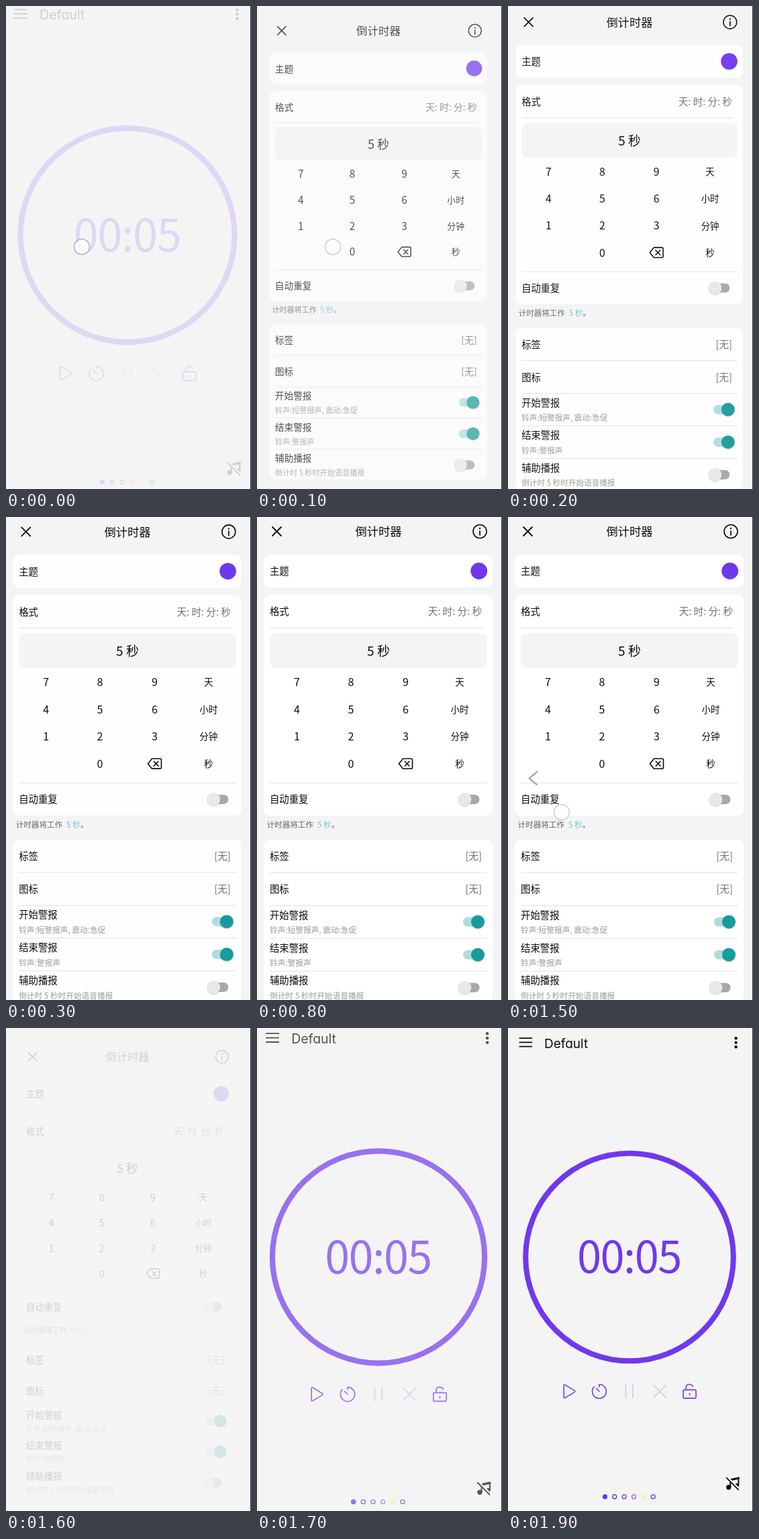
These frames come from a looping animation (365x720 px, 2 s). An HTML page:

```html
<!DOCTYPE html>
<html lang="zh-CN">
<head>
<meta charset="utf-8">
<title>倒计时器</title>
<style>
html, body { margin: 0; width: 100%; height: 100%; overflow: hidden; background: #f4f4f4; }
svg { display: block; width: 100vw; height: 100vh; }
text { font-family: "Noto Sans CJK SC", "Noto Sans CJK JP", "Noto Sans CJK", "Noto Sans", sans-serif; }
.name { font-family: Inter, Lato, sans-serif; font-feature-settings: "cv11"; }
.clock { letter-spacing: -1.5px; }
.line { fill: none; stroke-linecap: round; stroke-linejoin: round; }
</style>
</head>
<body>
<svg viewBox="0 0 365 720">
  <rect width="365" height="720" fill="#f4f4f4"/>
  <g id="timer"></g>
  <g id="settings"></g>
  <path id="back" class="line" d="M6-9.5L-5.5 0L6 9.5" stroke="#a9a9a9" stroke-width="2.3"/>
  <circle id="touch" r="11.5" fill="#fff" fill-opacity=".8" stroke-width="1.5"/>
  <rect x="364" width="1" height="720" fill="#2c2c2c"/>
</svg>
<script>
const $ = id => document.getElementById(id);
const PURPLE = '#6f37ee', INK = '#0c0c0c', GREY = '#707070', PALE = '#999';

const text = (x, cy, size, str, fill = INK, anchor = 'start', cls = '') =>
  `<text x="${x}" y="${cy + size * 0.37}" font-size="${size}" fill="${fill}" text-anchor="${anchor}" class="${cls}">${str}</text>`;
const stroke = (d, color, width = 1.6) =>
  `<path class="line" d="${d}" stroke="${color}" stroke-width="${width}"/>`;
const disc = (x, y, r, fill) => `<circle cx="${x}" cy="${y}" r="${r}" fill="${fill}"/>`;
const ring = (x, y, r, color, width) =>
  `<circle cx="${x}" cy="${y}" r="${r}" fill="none" stroke="${color}" stroke-width="${width}"/>`;
const box = (x, y, w, h, fill, rx = 9) =>
  `<rect x="${x}" y="${y}" width="${w}" height="${h}" rx="${rx}" fill="${fill}"/>`;
const rule = (y, end = 343) => box(19, y - 0.5, end - 19, 1, '#e2e2e2', 0);
const label = (y, str) => text(19, y, 14.4, str);
const note = (y, str) => text(19, y, 11.7, str, PALE);
const value = (y, str) => text(335, y, 14.6, str, GREY, 'end');

function toggle(y, on) {
  const x = on ? 329 : 309.5;
  return box(307, y - 7, 24.5, 14, on ? '#b0dddc' : '#a8a8a8', 7) +
    disc(x, y + 0.8, 10.4, 'rgba(0,0,0,.13)') +
    disc(x, y, 10, on ? '#169c9b' : '#e8e8e8');
}

function keypad() {
  const cols = [59.5, 140, 221.5, 302], rows = [246, 287, 327.5, 368];
  const keys = [['7', '8', '9', '天'], ['4', '5', '6', '小时'], ['1', '2', '3', '分钟'], ['', '0', '', '秒']];
  return keys.map((row, r) => row.map((key, c) =>
    text(cols[c], rows[r], c < 3 ? 16 : 13.5, key, INK, 'middle')).join('')).join('');
}

function settingsView() {
  return stroke('M23 15L36 28M36 15L23 28', INK, 1.8) +
    text(181, 22, 17.3, '倒计时器', INK, 'middle') +
    ring(332, 21.5, 10, INK, 1.6) + disc(332, 17, 1.2, INK) + stroke('M332 20.8V27', INK, 1.7) +
    box(10, 56, 341, 49, '#fff') + label(81, '主题') + disc(330.7, 80.5, 12.4, PURPLE) +
    box(10, 116, 341, 329, '#fff') + label(141, '格式') + value(141, '天: 时: 分: 秒') + rule(165.5, 336) +
    box(19, 173, 324, 52, '#f4f4f4') + text(181, 200, 19, '5 秒', INK, 'middle') +
    keypad() +
    stroke('M217.5 360.3H229.5Q231.5 360.3 231.5 362.3V373.2Q231.5 375.2 229.5 375.2H217.5L211.5 367.8Z', INK) +
    stroke('M220.3 364.3L227 371.2M227 364.3L220.3 371.2', INK) +
    rule(396.5) + label(421, '自动重复') + toggle(421, false) +
    text(14.5, 459, 11.6, '计时器将工作', '#666') + text(90, 459, 11.6, '5 秒', '#69c6d2') + text(111, 459, 11.6, '。', '#666') +
    box(10, 481, 341, 243, '#fff') +
    label(506, '标签') + value(506, '[无]') + rule(530) +
    label(555, '图标') + value(555, '[无]') + rule(579.5) +
    label(593.5, '开始警报') + note(616, '铃声:短警报声, 震动:急促') + toggle(603.5, true) + rule(628) +
    label(642.5, '结束警报') + note(665, '铃声:警报声') + toggle(652.5, true) + rule(677) +
    label(691, '辅助播报') + note(714, '倒计时 5 秒时开始语音播报') + toggle(701.5, false);
}

function timerView() {
  const dots = ['#4b3aa8', '#7541c4', '#a067cf', '', '#5644c4'];
  return stroke('M17.5 15.3H35.5M17.5 21.6H35.5M17.5 27.9H35.5', INK, 1.8) +
    text(54, 22.8, 19, 'Default', INK, 'start', 'name') +
    [15.5, 22, 28.5].map(y => disc(339.5, y, 2.2, INK)).join('') +
    ring(181, 341.5, 154.7, PURPLE, 8) +
    text(103, 341, 65, '00:05', PURPLE, 'start', 'clock') +
    stroke('M83.3 533.2Q83.3 530.8 85.4 532L99 540.3Q100.8 541.5 99 542.7L85.4 551Q83.3 552.2 83.3 549.8Z', PURPLE) +
    stroke('M136 534.8V531.2A10.4 10.4 0 1 1 128.2 534.7M131.7 537.3L136 541.6', PURPLE) +
    stroke('M175.5 532V551M186 532V551', '#d6cdf3', 2) +
    stroke('M217 532.5L235 550.5M235 532.5L217 550.5', '#d6cdf3', 2) +
    stroke('M263 539.3H278Q280 539.3 280 541.3V549.8Q280 551.8 278 551.8H263Q261 551.8 261 549.8V541.3Q261 539.3 263 539.3ZM265 539V536Q265 531.2 270 531.2Q274 531.2 275.3 534.4M270.5 544.5V547', PURPLE) +
    disc(328.6, 684.5, 3.6, INK) + disc(341, 681.5, 3, INK) +
    stroke('M331.2 684V673.5M343.3 681V670.5', INK, 2) +
    stroke('M332 673.3L343.3 670.8', INK, 3.2) +
    stroke('M326.5 670L344 687.5', '#f4f4f4', 4) + stroke('M325.5 670.5L343 688', INK, 1.8) +
    disc(144.5, 698.5, 3.7, PURPLE) +
    dots.map((c, i) => {
      const x = 158.8 + i * 14.35;
      return c ? ring(x, 698.5, 3, c, 1.3) : disc(x, 698.5, 4, '#f6f3b9');
    }).join('');
}

const LOOP = 2000, STEP = 100, CLOSE = 1600;

function place(el, alpha, scale) {
  el.setAttribute('opacity', alpha);
  el.setAttribute('transform', `translate(181 341) scale(${scale}) translate(-181 -341)`);
}

// The leaving view shows for one step, then the next one settles in.
function swap(since, leaving, entering, outScale, gap) {
  const leaves = since < STEP;
  const rest = Math.exp(-(since - STEP) / 55);
  place(leaving, leaves ? 0.15 : 0, outScale);
  place(entering, leaves ? 0 : 1 - 0.31 * rest, leaves ? 1 : 1 + gap * rest);
}

function moveTouch(t) {
  const tap = t < 200, swipe = t >= 1000 && t < CLOSE;
  const s = Math.min(1, Math.max(0, (t - 1000) / 500));
  const e = 1 - (1 - s) ** 2;
  const touch = $('touch'), back = $('back');
  touch.setAttribute('visibility', tap || swipe ? 'visible' : 'hidden');
  touch.setAttribute('cx', tap ? 113 : 20 + 60 * e);
  touch.setAttribute('cy', tap ? 359 : 431 + 9 * e);
  touch.setAttribute('stroke', t < STEP ? '#aeaed2' : '#cbced6');
  back.setAttribute('opacity', swipe ? Math.min(1, e * 1.3) : 0);
  back.setAttribute('transform', `translate(${4 + 33 * e} 389.5)`);
}

function render(ms) {
  const t = Math.floor((ms % LOOP) / STEP) * STEP;
  if (t < CLOSE) swap(t, $('timer'), $('settings'), 1.031, -0.048);
  else swap(t - CLOSE, $('settings'), $('timer'), 0.933, 0.022);
  moveTouch(t);
}

$('settings').innerHTML = settingsView();
$('timer').innerHTML = timerView();
const start = performance.now();
function tick() {
  render(performance.now() - start);
  requestAnimationFrame(tick);
}
tick();
</script>
</body>
</html>
```
